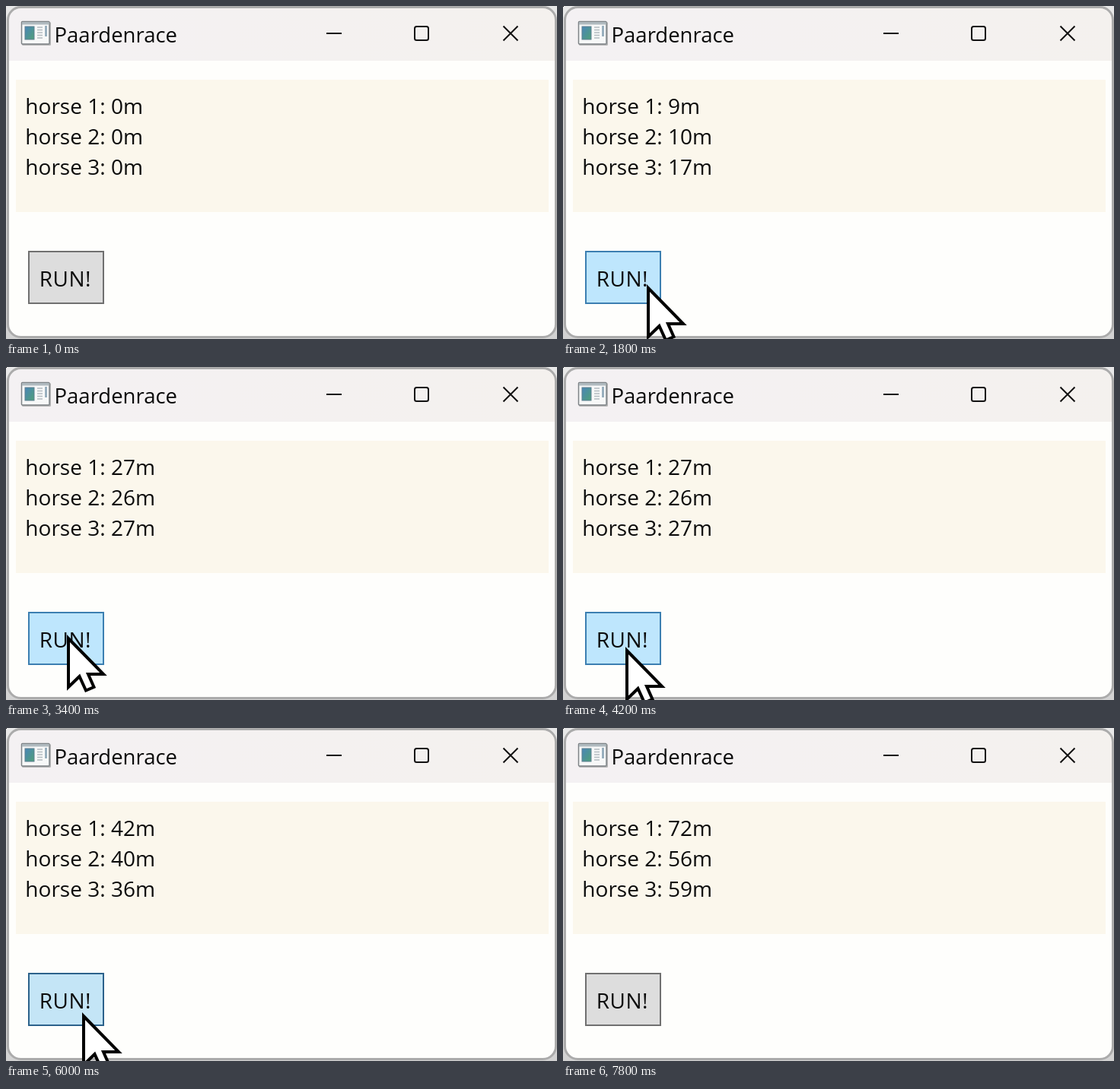
Animation, 724 px wide and 438 px high, one loop 8000 ms. Source, as an HTML page:

```html
<!DOCTYPE html>
<html lang="nl">
<head>
<meta charset="utf-8">
<title>Paardenrace</title>
<style>
  html, body { margin: 0; width: 100%; height: 100%; overflow: hidden; background: linear-gradient(#e8e8e8, #d2d2d2); }
  svg { display: block; width: 724px; height: 438px; }
  text { font-family: "Open Sans", "Noto Sans", sans-serif; font-size: 28px; fill: #0b0b0b; }
  .title { font-size: 27.5px; }
  .run { letter-spacing: 0.5px; }
  .glyph { fill: none; stroke: #111; stroke-width: 2; }
</style>
</head>
<body>
<svg viewBox="0 0 724 438">
  <defs>
    <clipPath id="frame"><rect x="3" y="2" width="719" height="434" rx="17"/></clipPath>
    <linearGradient id="bar">
      <stop offset="0" stop-color="#f4f1f3"/>
      <stop offset="1" stop-color="#f4f1ee"/>
    </linearGradient>
    <linearGradient id="photo" x2="1" y2="1">
      <stop offset="0" stop-color="#4a86b8"/>
      <stop offset="1" stop-color="#4f9f78"/>
    </linearGradient>
  </defs>

  <g clip-path="url(#frame)">
    <rect width="724" height="438" fill="#fefefc"/>
    <rect width="724" height="72" fill="url(#bar)"/>
  </g>
  <rect x="2.5" y="1.5" width="720" height="434" rx="17" fill="none" stroke="#ababab" stroke-width="3"/>
  <rect id="dot" width="1" height="1" fill="#000"/>

  <g id="icon">
    <rect x="21" y="21" width="38" height="31" rx="1.5" fill="#b4b4b4"/>
    <rect x="20.5" y="20.5" width="36.5" height="29.500" rx="1" fill="#f7f8f8" stroke="#7e8387" stroke-width="1.5"/>
    <rect x="21" y="21" width="35.500" height="3.500" fill="#b0babf"/>
    <rect x="25" y="27" width="12" height="17" fill="url(#photo)" stroke="#5d7f90"/>
    <path d="M41 28h7M41 31.5h7M41 35h7M41 38.5h7M41 42h7" stroke="#b4bbc0" stroke-width="1.3"/>
    <path d="M52.5 26v14" stroke="#8aa5b6" stroke-width="2.5"/>
  </g>
  <text class="title" x="63.5" y="48">Paardenrace</text>

  <g class="glyph">
    <path d="M421 36h20"/>
    <rect x="537" y="27" width="18" height="18" rx="2.5"/>
    <path d="M653.5 26.5l19 19m0-19l-19 19"/>
  </g>

  <rect x="13" y="97" width="700" height="174" fill="#fbf7ec"/>
  <g id="lines">
    <text x="25.3" y="142"></text>
    <text x="25.3" y="182"></text>
    <text x="25.3" y="222"></text>
  </g>

  <rect id="button" x="30" y="323" width="98" height="68" stroke-width="2"/>
  <text class="run" x="43.8" y="369">RUN!</text>

  <path id="cursor" d="M0 0L46 47H26L33.500 64L23 68.500L14.500 50L0 64Z"
        fill="#fff" stroke="#000" stroke-width="4"/>
</svg>
<script>
  const LOOP = 8000;
  const LOOK = {
    idle: ['#dddddd', '#707070'],
    hover: ['#bee6fd', '#3c7fb1'],
    down: ['#c4e5f6', '#2c628b']
  };

  // time, distance of each horse
  const SCORES = [
    [0, 0, 0, 0],
    [1600, 9, 10, 17],
    [3200, 27, 26, 27],
    [4600, 34, 32, 31],
    [5600, 42, 40, 36],
    [6200, 57, 48, 47],
    [7600, 72, 56, 59]
  ];

  // time, pointer x and y (none = hidden), button look
  const POSES = [
    [0, null, null, 'idle'],
    [1200, 107, 372, 'hover'],
    [1400, 107, 372, 'down'],
    [1600, 108, 372, 'hover'],
    [1800, 112, 371, 'hover'],
    [2000, 122, 368, 'hover'],
    [2200, 148, 362, 'idle'],
    [2400, 178, 358, 'idle'],
    [2600, 150, 361, 'idle'],
    [2800, 104, 360, 'hover'],
    [3000, 84, 358, 'down'],
    [3200, 82, 357, 'hover'],
    [3600, 82, 361, 'hover'],
    [3800, 83, 366, 'hover'],
    [4000, 84, 370, 'hover'],
    [4200, 84, 373, 'hover'],
    [4400, 86, 374, 'down'],
    [4600, 219, 364, 'idle'],
    [4800, 226, 362, 'idle'],
    [5000, 168, 370, 'idle'],
    [5200, 106, 378, 'hover'],
    [5400, 102, 379, 'down'],
    [5600, 102, 379, 'hover'],
    [6000, 102, 379, 'down'],
    [6200, 110, 378, 'hover'],
    [6400, 180, 372, 'idle'],
    [6600, 330, 365, 'idle'],
    [6800, 480, 360, 'idle'],
    [7000, 558, 358, 'idle'],
    [7200, 300, 366, 'idle'],
    [7400, 104, 374, 'down'],
    [7600, 106, 374, 'hover'],
    [7800, null, null, 'idle']
  ];

  const $ = id => document.getElementById(id);
  const dot = $('dot'), button = $('button'), cursor = $('cursor');
  const lines = [...$('lines').children];
  const at = (table, t) => table.findLast(row => row[0] <= t);
  const show = (el, on) => el.setAttribute('visibility', on ? 'visible' : 'hidden');

  function draw(t) {
    const [, x, y, look] = at(POSES, t);
    const score = at(SCORES, t);
    const [fill, stroke] = LOOK[look];

    lines.forEach((line, i) => {
      line.textContent = `horse ${i + 1}: ${score[i + 1]}m`;
    });
    button.setAttribute('fill', fill);
    button.setAttribute('stroke', stroke);
    show(dot, t >= 200);
    show(cursor, x !== null);
    if (x !== null) cursor.setAttribute('transform', `translate(${x} ${y})`);
  }

  const start = performance.now();
  function tick() {
    draw((performance.now() - start) % LOOP);
    requestAnimationFrame(tick);
  }
  tick();
</script>
</body>
</html>
```
